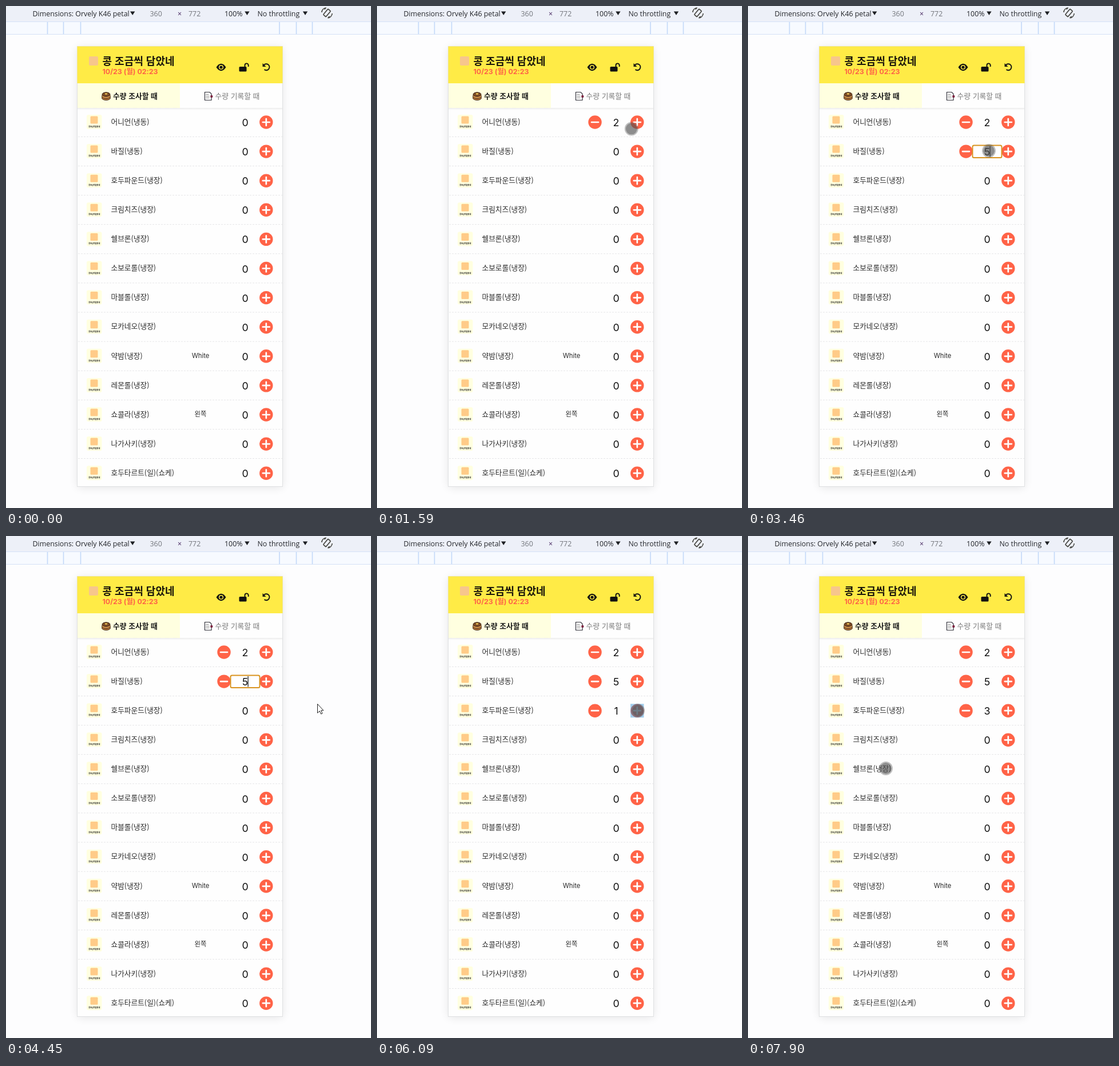
An HTML page for the animation above (8000 ms loop, 638 by 877 pixels).

```html
<!DOCTYPE html>
<html lang="ko">
<head>
<meta charset="utf-8">
<title>Bakery stock</title>
<style>
  html, body { margin: 0; width: 100%; height: 100%; overflow: hidden; background: #fdfdfe; }
  svg { display: block; width: 100vw; height: 100vh; }
  text { white-space: pre; }
  .ko { font-family: "Noto Sans CJK KR", "Noto Sans CJK", sans-serif; }
  .num { font-family: Inter, "Noto Sans CJK KR", "Noto Sans CJK", sans-serif; }
  .bar { font-family: "Open Sans", "Noto Sans", sans-serif; font-size: 12.4px; }
  .mid { text-anchor: middle; }
</style>
</head>
<body>
<svg viewBox="0 0 638 877">
  <defs>
    <filter id="soft" x="-20%" y="-20%" width="140%" height="140%"><feGaussianBlur stdDeviation="8"/></filter>
    <linearGradient id="fade" x2="0" y2="1">
      <stop stop-opacity=".07"/><stop offset="1" stop-opacity="0"/>
    </linearGradient>
    <clipPath id="screen"><rect x="125" y="71" width="358" height="768"/></clipPath>
    <path id="drop" d="M-4.2 9.5h8.4L0 16z" fill="#1d1f23"/>
    <g id="plus">
      <circle r="11.7" fill="#ff6347"/>
      <path d="M-6 0H6M0-6V6" stroke="#fff" stroke-width="2.7" stroke-linecap="round"/>
    </g>
    <g id="minus">
      <circle r="11.7" fill="#ff6347"/>
      <path d="M-6 0H6" stroke="#fff" stroke-width="2.7" stroke-linecap="round"/>
    </g>
  </defs>

  <g id="toolbar">
    <rect width="638" height="27" fill="#edf0f8"/>
    <rect y="27" width="638" height="23" fill="#f7faff"/>
    <path d="M0 27.5H638M0 49.5H638" stroke="#d5e2f7"/>
    <path d="M72.5 28V49M100.5 28V49M130.5 28V49M478 28V49M507.5 28V49M535.5 28V49" stroke="#c3d9f8" stroke-width="1.6"/>
    <g class="bar" fill="#24262b">
      <text x="46.5" y="18">Dimensions: Orvely K46 petal</text>
      <text x="251.5" y="18" fill="#74777d">360</text>
      <text x="300" y="18" fill="#4a2a63">×</text>
      <text x="319" y="18" fill="#74777d">772</text>
      <text x="382" y="18">100%</text>
      <text x="439.5" y="18">No throttling</text>
    </g>
    <use href="#drop" x="221.2"/><use href="#drop" x="421.4"/><use href="#drop" x="523"/>
    <g transform="translate(561 12) scale(-1 1)" fill="none" stroke="#4a4a45" stroke-width="1.7">
      <rect x="-3" y="-6.5" width="6" height="13" rx="1" transform="rotate(-40)"/>
      <path d="M1.5-9A9.2 9.2 0 0 1 9.2-1M-1.5 9A9.2 9.2 0 0 1-9.2 1M1.5-9l3 3M-1.5 9l-3-3"/>
    </g>
  </g>

  <rect x="125" y="73" width="358" height="768" opacity=".1" filter="url(#soft)"/>
  <rect x="124.5" y="70.5" width="359" height="769" fill="#fefefe" stroke="#dfe0e2"/>

  <g id="header">
    <rect x="124.5" y="70.5" width="359" height="64.5" fill="#ffeb46"/>
    <rect x="145" y="88" width="16" height="16" rx="2" fill="#f7c68c"/>
    <text class="ko" x="168.5" y="102.6" font-size="18" font-weight="900" fill="#17130a">콩 조금씩 담았네</text>
    <text class="num" x="168.5" y="119.3" font-size="12.4" font-weight="700" fill="#ff6347">10/23 (월) 02:23</text>
    <g fill="#111">
      <path d="M367.5 107Q376 94.5 384.5 107Q376 119.5 367.5 107z"/>
      <circle cx="376" cy="107" r="4.1" fill="#ffeb46"/>
      <circle cx="376" cy="107" r="2.6"/>
      <rect x="407.5" y="106" width="13" height="8.5" rx="1.6"/>
      <path d="M417.5 107V103.500a3.100 3.100 0 0 1 6.200 0V106" fill="none" stroke="#111" stroke-width="1.9"/>
      <path d="M450.5 103.500A5.500 5.500 0 1 1 451.500 111" fill="none" stroke="#111" stroke-width="1.9"/>
      <path d="M448.5 100v6h6z"/>
    </g>
  </g>

  <g id="tabs">
    <rect x="125" y="135" width="179" height="43" fill="#ffffe0"/>
    <rect x="125" y="178" width="358" height="4" fill="url(#fade)"/>
    <g stroke="#3b2415">
      <ellipse cx="175" cy="160.5" rx="7.5" ry="4" fill="#b9773a"/>
      <ellipse cx="175" cy="157.5" rx="7.5" ry="4" fill="#d9974d"/>
      <ellipse cx="175" cy="154.5" rx="7" ry="3.7" fill="#7a4a25"/>
      <path d="M173 153.5h4" stroke="#ffd75a" stroke-width="2"/>
    </g>
    <path d="M347.5 150.5h8.5l3 3v11h-11.5z" fill="#fff" stroke="#33333b" stroke-width="1.2"/>
    <path d="M349.5 154.5h5m-5 3h6m-6 3h6" stroke="#888"/>
    <circle cx="359.3" cy="158" r="2.2" fill="#7d2340"/>
    <text class="ko" x="187" y="161.7" font-size="12.8" font-weight="700" fill="#1b1b1b">수량 조사할 때</text>
    <text class="ko" x="365.5" y="161.7" font-size="12.8" fill="#7c7c7c">수량 기록할 때</text>
  </g>

  <g id="list" clip-path="url(#screen)"></g>

  <g id="field">
    <rect x="392.5" y="243.5" width="51" height="21.5" rx="2.5" fill="#fff" stroke="#d99420" stroke-width="2"/>
    <text id="typed" class="num mid" x="418" y="260.8" font-size="17.8" fill="#111"></text>
    <rect id="caret" y="245" width="1.2" height="18.5" fill="#111"/>
  </g>

  <g id="pointer">
    <g id="touch" fill="#505050">
      <circle r="10" fill-opacity=".65"/>
      <circle r="11" fill="none" stroke="#505050" stroke-opacity=".36" stroke-width="2"/>
    </g>
    <path id="arrow" d="M.5.5V16.2L4.2 12.8L6.6 18L9 17L6.7 11.8H11z" fill="#fff" stroke="#222" stroke-linejoin="round"/>
  </g>
</svg>

<script>
const LOOP = 8000, TICK = 1000 / 15, PITCH = 51.1;
const PRESS = 130, BLINK = 490, PHONE_RIGHT = 483;
const EDIT = { open: 2525, focus: 2635, type: 3455, blur: 4515 };

const $ = id => document.getElementById(id);
const show = (el, on) => el.setAttribute('visibility', on ? 'inherit' : 'hidden');
const ease = f => f * f * (3 - 2 * f);

const names = ['어니언(냉동)', '바질(냉동)', '호두파운드(냉장)', '크림치즈(냉장)', '쉘브론(냉장)',
  '소보로롤(냉장)', '마블롤(냉장)', '모카네오(냉장)', '약밤(냉장)', '레몬롤(냉장)',
  '쇼콜라(냉장)', '나가사키(냉장)', '호두타르트(일)(쇼케)'];
const notes = { '약밤(냉장)': 'White', '쇼콜라(냉장)': '왼쪽' };

// Each row is drawn around the centre line of its buttons
$('list').innerHTML = names.map((name, i) => `
  <g transform="translate(0 ${(203 + i * PITCH).toFixed(1)})">
    <rect x="141" y="-13" width="26.5" height="25" rx="3" fill="#ffffe0"/>
    <rect x="147.5" y="-10.5" width="13" height="13" rx="1.5" fill="#ffcb88"/>
    <text class="ko mid" x="154.3" y="9" font-size="3.1" font-weight="900" fill="#111">콩조금씩담았네</text>
    <text class="ko" x="183.5" y="3.7" font-size="12.7" fill="#2b2b2b">${name}</text>
    <text class="num mid" x="340" y="3.2" font-size="11.3" fill="#2b2b2b">${notes[name] || ''}</text>
    <use class="minus" href="#minus" x="381"/>
    <text class="count num mid" x="418" y="7" font-size="17.8" fill="#111">0</text>
    <use href="#plus" x="454.8"/>
    <rect class="tap" x="443" y="-12" width="23.5" height="24" fill="#4aa0dc" fill-opacity=".5"/>
    <path d="M126 25.4H483" stroke="#e6e6e8" stroke-dasharray="3 2"/>
  </g>`).join('');

const rows = [...$('list').children].map(row => ({
  minus: row.querySelector('.minus'), count: row.querySelector('.count'), tap: row.querySelector('.tap')
}));

// Evenly spaced taps on the plus button of a row
const bursts = [{ row: 0, first: 995, gap: 270, taps: 2 }, { row: 2, first: 6025, gap: 200, taps: 3 }];

const moves = [
  { from: 0, to: 600, x: 458, y: 166 },
  { from: 600, to: 733, x: 452, y: 203 },
  { from: 1450, to: 1930, x: 421, y: 253 },
  { from: 3930, to: 4400, x: 544, y: 293 },
  { from: 5000, to: 5333, x: 360, y: 319 },
  { from: 5333, to: 5830, x: 456, y: 305 },
  { from: 6770, to: 7700, x: 241, y: 406 }
];

function pointAt(t) {
  let x = 600, y = 890;
  for (const move of moves) {
    if (t < move.from) break;
    const f = ease(Math.min(1, (t - move.from) / (move.to - move.from)));
    x += (move.x - x) * f;
    y += (move.y - y) * f;
  }
  return [x, y];
}

function draw(t) {
  const editing = t >= EDIT.open && t < EDIT.blur;
  const filled = t >= EDIT.type;

  rows.forEach(({ minus, count, tap }, i) => {
    const burst = bursts.find(b => b.row === i);
    let value = i === 1 && filled ? 5 : 0, pressed = false;
    for (let n = 0; burst && n < burst.taps; n++) {
      const age = t - burst.first - n * burst.gap;
      if (age >= PRESS / 2) value++;
      if (age >= 0 && age < PRESS) pressed = true;
    }
    count.textContent = value;
    show(count, !(i === 1 && editing));
    show(minus, value > 0);
    show(tap, pressed);
  });

  const caretAge = t - (filled ? EDIT.type : EDIT.focus);
  show($('field'), editing);
  $('typed').textContent = filled ? '5' : '';
  $('caret').setAttribute('x', filled ? 422.5 : 417.3);
  show($('caret'), editing && caretAge >= 0 && Math.floor(caretAge / BLINK) % 2 === 0);

  // The pointer moves at 15 steps a second
  const [x, y] = pointAt(Math.floor((t + 10) / TICK) * TICK);
  const outside = x > PHONE_RIGHT;
  const pressedOutside = t >= EDIT.blur && t < EDIT.blur + 150;
  $('pointer').setAttribute('transform', `translate(${x.toFixed(1)} ${y.toFixed(1)})`);
  show($('arrow'), outside);
  show($('touch'), !outside || pressedOutside);
}

const start = performance.now();
function frame() {
  draw((performance.now() - start) % LOOP);
  requestAnimationFrame(frame);
}
frame();
</script>
</body>
</html>
```
